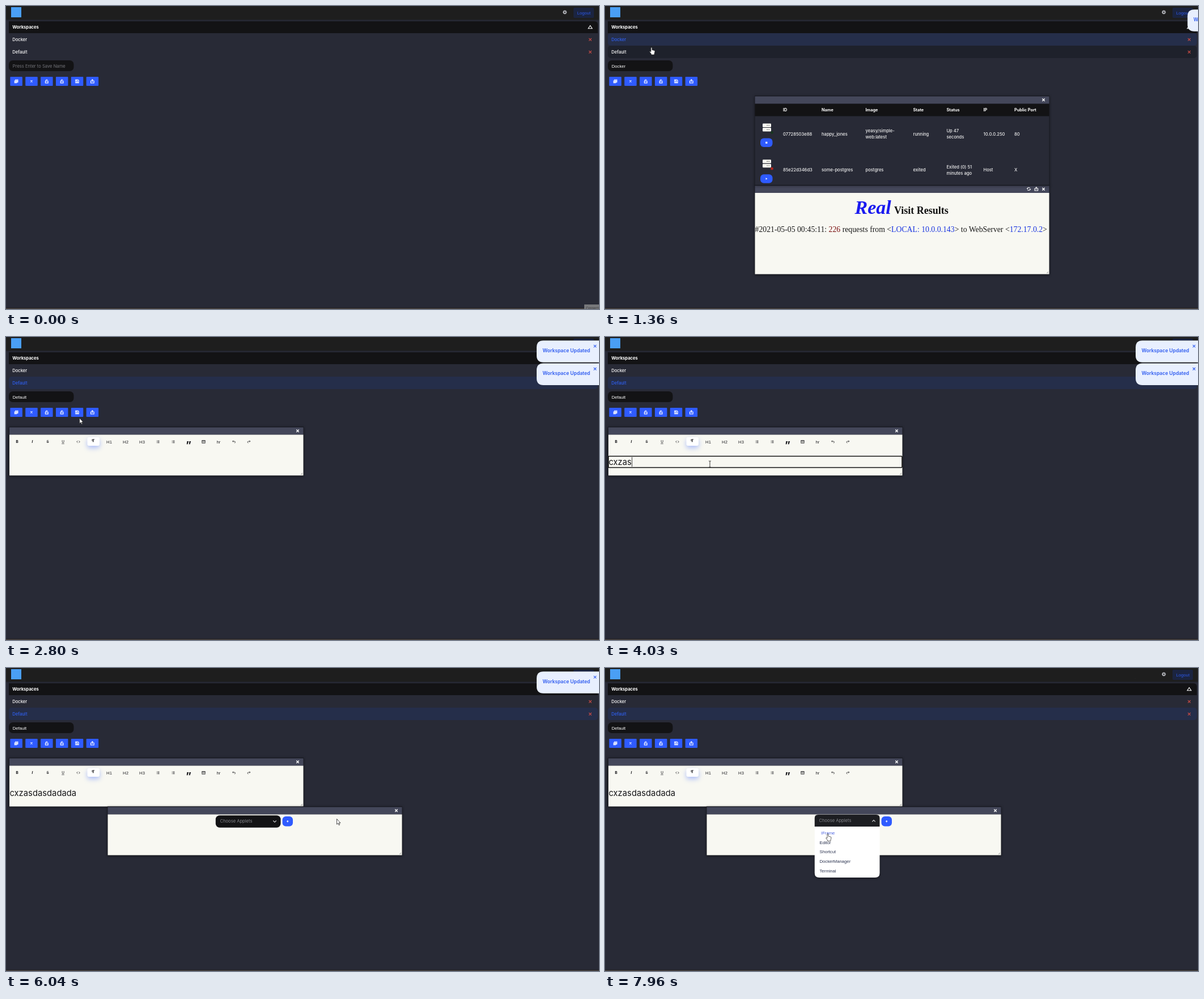
These frames come from a looping animation (1046 by 535 pixels, 8 s). An HTML page:

```html
<!DOCTYPE html>
<html lang="en">
<head>
<meta charset="utf-8">
<title>Workspaces</title>
<style>
  html, body { margin: 0; width: 100%; height: 100%; overflow: hidden; background: #282a36; }
  svg { display: block; width: 1046px; height: 535px; }
  text { font: 500 7.6px Inter, sans-serif; white-space: pre; }
  .arial { font: 7.7px "Liberation Sans", sans-serif; }
  .serif { font: 13.75px "Liberation Serif", serif; }
  .line { fill: none; stroke-width: 1.1; }
  .win { filter: drop-shadow(0 1px 2px #0008); }
</style>
</head>
<body>
<svg id="stage" viewBox="0 0 1046 535"></svg>
<script>
const LOOP = 8000;
const BLUE = '#2f5bff', PAPER = '#f8f8f2', BLACK = '#131315', BAR = '#44475a', INK = '#222226';

const rect = (x, y, w, h, fill, rx = 0, extra = '') =>
  `<rect x="${x}" y="${y}" width="${w}" height="${h}" fill="${fill}" rx="${rx}" ${extra}/>`;
const text = (x, y, str, fill = '#fff', extra = '') =>
  `<text x="${x}" y="${y}" fill="${fill}" ${extra}>${str}</text>`;
const mid = (x, y, str, fill, extra = '') => text(x, y, str, fill, `text-anchor="middle" ${extra}`);
const line = (x, y, d, color, extra = '') =>
  `<path class="line" transform="translate(${x} ${y})" d="${d}" stroke="${color}" ${extra}/>`;
const group = (id, body, extra = '') => `<g id="${id}" ${extra}>${body}</g>`;
const cross = (x, y, r, color, width = 1.1) =>
  line(x, y, `M${-r} ${-r}L${r} ${r}M${r} ${-r}L${-r} ${r}`, color, `style="stroke-width:${width}"`);

const SHARE = 'M-1.4-.8h-1.4V3h5.6V-.8H1.4M0 1.2V-3M-1.5-1.6L0-3.1 1.5-1.6';
const LOCK = 'M-2.4-.3h4.8v3.2h-4.8zM-1.4-.3v-1.3a1.4 1.4 0 0 1 2.8 0';
const LIST = 'M-2.4-1.8h.8M-2.4 0h.8M-2.4 1.8h.8M-.8-1.8h3.3M-.8 0h3.3M-.8 1.8h3.3';
const UNDO = 'M-.8-2.2L-2.4-.8-.8.6M-2.2-.8H1a1.4 1.4 0 0 1 0 2.8';

function header() {
  const gear = Array.from({ length: 8 }, (_, i) =>
    `<path d="M0-3.6V-2" stroke="#b8bac0" stroke-width="1.4" transform="rotate(${i * 45})"/>`).join('');
  return rect(0, 0, 1046, 24, '#1e1e1e') + rect(0, 24, 1046, 1.5, '#23242c') +
    rect(9, 2, 18, 18, '#4a9ff5') +
    `<g transform="translate(985.7 11)">${gear}<circle r="2" fill="none" stroke="#b8bac0" stroke-width="1.5"/></g>` +
    rect(1001, 3, 36, 18, '#1b2440', 2) + text(1007.5, 14.7, 'Logout', '#2c58e8', 'class="arial"');
}

function workspaceList() {
  const row = (id, y, name) =>
    rect(5, y, 1039, 22, 'none', 5, `id="${id}Bg"`) +
    text(11.3, y + 13.7, name, '#fff', `id="${id}Name"`) + cross(1030.5, y + 11.3, 2.3, '#c94b45');
  return `<path d="M5 27H1038q6 0 6 6V48H5z" fill="${BLACK}"/>` +
    text(11.3, 40, 'Workspaces', '#fff', 'style="font-weight:700"') +
    line(1030.5, 37, 'M-3.5 2.8L0-2.6 3.5 2.8z', '#fff') +
    row('docker', 48, 'Docker') + row('default', 70, 'Default') +
    rect(5, 96, 114.5, 19, BLACK, 7) +
    text(11.8, 108.6, 'Press Enter to Save Name', '#73747a', 'id="hint" style="font-weight:400"') +
    rect(11, 99, 25, 13, BLACK, 0, 'id="hintCover"') +
    text(11.8, 108.5, '', '#fff', 'id="nameValue" class="arial"');
}

function actions() {
  const icons = [
    'M-1.4-2.8h4.2v4.2h-4.2zM-2.8-1.4v4.2h4.2M.7-2v2.8M-.7-.6h2.8',
    'M-1.6-1.6L1.6 1.6M1.6-1.6L-1.6 1.6', LOCK, LOCK,
    'M-2.7-2.7h4.2l1.2 1.2v4.2h-5.4zM-1.3-2.5v1.5h2.4M-1 2.5V.8h2v1.7', SHARE];
  return icons.map((d, i) => {
    const x = 7.4 + i * 26.85;
    return rect(x, 125, 21.5, 16, BLUE, 1) + line(x + 10.7, 133, d, '#fff');
  }).join('');
}

// Window at the origin; the caller's group places it.
function panel(w, h, bodyFill, content, tools = false) {
  const extras = tools
    ? line(w - 36, 6.5, 'M-2.4-.8A2.5 2.5 0 0 1 2.2-1.2M2.4.8A2.5 2.5 0 0 1-2.2 1.2M-3.6-.6h2.3M3.6.6H1.3', '#fff') +
      line(w - 22.7, 6.5, SHARE, '#fff') : '';
  const grip = bodyFill === PAPER ? line(w - 4.5, h - 4.5, 'M0 3L3 0M2 3L3 2', '#777', 'style="stroke-width:.7"') : '';
  return rect(-.5, -.5, w + 1, h + 1, '#15161c') + rect(0, .5, w, 13, BAR) +
    rect(0, 13.5, w, h - 13.5, bodyFill) + extras + cross(w - 10, 6.8, 2.2, '#fff', 1.4) + content + grip;
}

function containerTable() {
  const cols = [49.5, 117.5, 195, 279, 338, 403, 457.5];
  const heads = ['ID', 'Name', 'Image', 'State', 'Status', 'IP', 'Public Port'];
  const rows = [
    ['07728503e88', 'happy_jones', 'yeasy/simple-|web:latest', 'running', 'Up 47|seconds', '10.0.0.250', '80'],
    ['85e22d346d3', 'some-postgres', 'postgres', 'exited', 'Exited (0) 51|minutes ago', 'Host', 'X']];
  const cell = (x, y, str) => {
    const parts = str.split('|');
    return parts.map((p, i) => text(x, y + (i - (parts.length - 1) / 2) * 10.6, p, '#f1f1f1')).join('');
  };
  return rect(0, 14, 519, 21.5, BLACK) +
    heads.map((h, i) => text(cols[i], 27.2, h, '#fff', 'style="font-weight:700;font-size:7.3px"')).join('') +
    rows.map((r, n) => {
      const y = 69.5 + n * 63.7;
      const icon = n ? 'M-1.2-1.7L1.7 0-1.2 1.7z' : 'M-1.6-1.6h3.2v3.2h-3.2z';
      return r.map((s, i) => cell(cols[i], y, s)).join('') +
        [-21, -13.4].map(dy => rect(13.5, y + dy, 15, 6.4, PAPER, 1.2) +
          line(21, y + dy + 3.2, 'M0 0h1.4M3 0h1.4', '#333')).join('') +
        `<circle cx="30" cy="${y - 5}" r="2.4" fill="${n ? '#b3261e' : '#17351f'}"/>` +
        rect(9.5, y + 5, 21.5, 15.5, BLUE, 6) +
        `<path transform="translate(20.3 ${y + 12.8})" d="${icon}" fill="#fff"/>`;
    }).join('');
}

function visitPage() {
  const link = s => `<tspan fill="#1a35e0">${s}</tspan>`;
  return text(176, 50, 'Real', '#1a1af0', 'style="font:italic bold 34px Liberation Serif,serif"') +
    text(245.5, 50, 'Visit Results', '#111', 'style="font:bold 18px Liberation Serif,serif"') +
    text(0, 82, `#2021-05-05 00:45:11: <tspan fill="#7a1010">226</tspan> requests from &lt;${link('LOCAL: 10.0.0.143')}&gt; to WebServer &lt;${link('172.17.0.2')}&gt;`,
      '#1a1a1a', 'class="serif"');
}

function editor() {
  const y = 28.5;
  const glyphs = [[13.5, 'B', 'font-weight:800'], [40.5, 'I', 'font-style:italic;font-weight:800'],
    [67.5, 'S', 'text-decoration:line-through'], [94.5, 'U', 'text-decoration:underline'],
    [176, 'H1'], [205, 'H2'], [234, 'H3'], [316, '”', 'font:800 17px Inter,sans-serif'], [369, 'hr']];
  const icons = [[121.5, 'M-1-1.8L-2.8 0-1 1.8M1-1.8L2.8 0 1 1.8'], [262, LIST], [289, LIST],
    [342.5, 'M-2.8-2.4h5.6v4.8h-5.6zM-2.8-1.2h5.6M-.6 0L-1.4.7-.6 1.4M.6 0L1.4.7.6 1.4'], [396, UNDO]];
  return rect(137.5, 18, 21.5, 15, '#fff', 3, 'style="filter:drop-shadow(0 4px 4px #4068ff66)"') +
    line(148, 24, 'M.4 2.4V-2.2M-.9 2.4V-2.2M2.2-2.2H-1.2a1.2 1.2 0 0 0 0 2.4', INK, 'style="stroke-width:.8"') +
    glyphs.map(([x, s, css = 'font:7.7px Liberation Sans,sans-serif'], i) =>
      mid(x, i === 7 ? 37.5 : i < 4 ? 28.2 : 28.7, s, INK, `style="${i < 4 ? 'font-size:6.4px;' : ''}${css}"`)).join('') +
    icons.map(([x, d]) => line(x, y - 2.5, d, INK, 'style="stroke-width:.8"')).join('') +
    line(422.5, y - 2.5, UNDO, INK, 'transform-origin="0 0" style="stroke-width:.8;transform:translate(422.5px,26px) scaleX(-1)"') +
    rect(0, 51.5, 518, 20, 'none', 1, 'id="focusRing" stroke="#111" stroke-width="1.6"') +
    text(.4, 66.5, '', '#17171a', 'id="typed" style="font-size:14.8px;font-weight:400"') +
    rect(0, 53, .8, 17, '#111', 0, 'id="caret"');
}

function chooser() {
  const items = ['IFrame', 'Editor', 'Shortcut', 'DockerManager', 'Terminal'];
  const prompt = (y, d) => text(198, y, 'Choose Applets', '#85868c', 'style="font-weight:400"') +
    line(294.5, y - 2.4, d, '#d5d5d8');
  return group('closed', rect(190.3, 15.3, 114.7, 21.5, BLACK, 7) + prompt(28.3, 'M-2.7-1.4L0 1.4 2.7-1.4')) +
    group('menu', '<path d="M190.3 35H305V117q0 8-8 8H198.300q-8 0-8-8z" fill="#fff"/>' +
      `<path d="M190.300 35V20q0-6 6-6H299q6 0 6 6V35z" fill="#1d1e22"/>` +
      prompt(27.4, 'M-2.7 1.4L0-1.4 2.7 1.4') +
      items.map((s, i) => text(199, 49 + i * 16.7, s, '#2b3350', `class="arial item"`)).join('')) +
    rect(308, 17, 18.5, 17.5, BLUE, 6) + line(317.2, 25.7, 'M-1.7 0h3.4M0-1.7v3.4', '#fff');
}

const toast = id => group(id,
  '<path d="M1080 0H948q-12 0-12 12V26.500q0 12 12 12H1080z" fill="#e8effe"/>' +
  text(946.5, 20.3, 'Workspace Updated', '#2f5cf0', 'style="font-size:8.5px;font-weight:600"') +
  cross(1039, 9.8, 2.3, '#2f5cf0'));

const HAND = 'M-1 .6Q0-.6 1 .6V4.500L5 5.600Q6.200 6 6 7.500L5 11.500V13H-.5V11.500L-3.400 7.800Q-3.200 6.300-1 7.800z';
const cursorArt =
  group('hand', `<path d="${HAND}" fill="#fff" stroke="#222" stroke-width=".7"/>`) +
  group('arrow', '<path d="M0 0V9.500L2.200 7.600 3.800 11 5.200 10.300 3.700 7.100H6.500z" fill="#fff" stroke="#222" stroke-width=".8"/>') +
  group('beam', line(0, 0, 'M-2-5.500H-.5L0-5 .5-5.500H2M-2 5.500H-.5L0 5 .5 5.500H2M0-5V5', '#222', 'style="stroke-width:.9"'));

const stage = document.getElementById('stage');
stage.innerHTML = rect(0, 0, 1046, 535, '#282a36') +
  rect(0, 532, 1046, 1.5, '#1f2029') + rect(0, 533.5, 1046, 1.5, '#49433f') +
  header() + workspaceList() + actions() +
  group('web', panel(519, 157, PAPER, group('visits', visitPage()), true), 'class="win"') +
  group('table', panel(519, 157, '#282a36', containerTable()), 'class="win"') +
  group('notes', panel(518.5, 85.5, PAPER, editor()), 'class="win" transform="translate(6 159)"') +
  group('picker', panel(519, 85.5, PAPER, chooser()), 'class="win"') +
  toast('toastA') + toast('toastB') +
  group('status', rect(1020, 527, 26, 8, '#77787b') + text(1023, 535.5, 'Connect', '#3c3c40', 'style="font-size:5.5px"')) +
  group('cursor', cursorArt);

const $ = id => document.getElementById(id);
const items = [...document.querySelectorAll('.item')];
const show = (id, on) => { $(id).style.display = on ? '' : 'none'; };
const place = (id, x, y) => $(id).setAttribute('transform', `translate(${x} ${y})`);
const ease = (t, a, b) => {
  const p = Math.min(1, Math.max(0, (t - a) / (b - a)));
  return p * p * (3 - 2 * p);
};
const between = (t, a, b) => t >= a && t < b;

// time, x, y, pointer shape from then on
const pointer = [
  [70, 1030, 515, 'arrow'], [700, 89, 60, 'hand'], [1220, 89, 60, 'hand'], [1340, 82, 73, 'hand'],
  [2530, 82, 73, 'arrow'], [3100, 185, 224.5, 'beam'], [4780, 185, 224.5, 'arrow'], [4990, 46, 132, 'hand'],
  [5180, 18, 131, 'hand'], [5360, 18, 131, 'arrow'], [5900, 583.5, 266.5, 'arrow'], [6080, 583.5, 266.5, 'arrow'],
  [6400, 430, 269, 'hand'], [6500, 430, 269, 'hand'], [6720, 418, 312, 'hand'], [6900, 408, 319, 'hand'],
  [7250, 392, 303, 'hand'], [7500, 391, 294, 'hand'], [7620, 393, 292.5, 'hand'], [LOOP, 393, 292.5, 'hand']];

const keys = [[3690, 'c'], [3760, 'cx'], [4030, 'cxzas'], [4100, 'cxzasd'],
  ...[...'asdadada'].map((_, i, tail) => [4240 + i * 70, 'cxzasd' + tail.slice(0, i + 1).join('')])];

function drawPointer(t) {
  show('cursor', t >= 70);
  const i = Math.max(0, pointer.findLastIndex(k => k[0] <= t));
  const [t0, x0, y0, kind] = pointer[i], [t1, x1, y1] = pointer[i + 1];
  const p = ease(t, t0, t1), y = y0 + (y1 - y0) * p;
  place('cursor', x0 + (x1 - x0) * p, y);
  for (const k of ['hand', 'arrow', 'beam']) show(k, k === kind);
  return y;
}

function drawRows(t) {
  const paint = (id, selected, hover) => {
    $(id + 'Bg').setAttribute('fill', selected ? '#252e4a' : hover ? '#1e212b' : 'none');
    $(id + 'Name').setAttribute('fill', selected ? '#2f60f0' : hover && id === 'docker' ? '#c4d6ff' : '#fff');
  };
  paint('docker', between(t, 1220, 1900), between(t, 650, 1220));
  paint('default', t >= 1900, between(t, 1290, 1900));
  show('hint', t < 1220);
  show('hintCover', between(t, 1080, 1220));
  $('nameValue').textContent = t < 1080 ? '' : t < 1900 ? 'Docker' : 'Default';
}

function drawWindows(t) {
  const slide = ease(t, 1200, 1350);
  show('web', between(t, 1100, 1900));
  show('table', between(t, 1220, 1900));
  show('visits', t >= 1290);
  place('web', 5 + 259.5 * slide, 159 + 157.5 * slide);
  place('table', 5 + 259.5 * slide, 159);
  show('notes', t >= 1950);
  show('picker', t >= 5300);
  place('picker', 6 + 173.5 * ease(t, 5320, 5560), 245);
}

function drawTyping(t) {
  const focused = between(t, 3170, 5200);
  const typed = keys.findLast(k => k[0] <= t);
  $('typed').textContent = typed ? typed[1] : '';
  show('focusRing', focused);
  show('caret', focused);
  if (focused) $('caret').setAttribute('x', typed ? $('typed').getComputedTextLength() + .8 : .8);
}

function drawMenu(t, y) {
  const open = ease(t, 6450, 6600);
  show('closed', open === 0);
  show('menu', open > 0);
  $('menu').style.opacity = open;
  const hovered = t > 6650 ? (y < 301 ? 0 : y < 317.5 ? 1 : 2) : -1;
  items.forEach((item, i) => {
    item.setAttribute('x', i === hovered ? 201.5 : 199);
    item.setAttribute('fill', i === hovered ? '#4a63e0' : '#2b3350');
  });
}

function drawToasts(t) {
  const offset = (enter, leave) => 112 * (1 - ease(t, enter, enter + 260) + ease(t, leave, leave + 300));
  place('toastA', offset(1290, 5330), 6.3 + 40.2 * ease(t, 1975, 2240));
  place('toastB', offset(2060, 6110), 6.3);
}

function frame() {
  const t = performance.now() % LOOP;
  show('status', t < 140);
  drawRows(t);
  drawWindows(t);
  drawTyping(t);
  drawToasts(t);
  drawMenu(t, drawPointer(t));
  requestAnimationFrame(frame);
}
frame();
</script>
</body>
</html>
```
